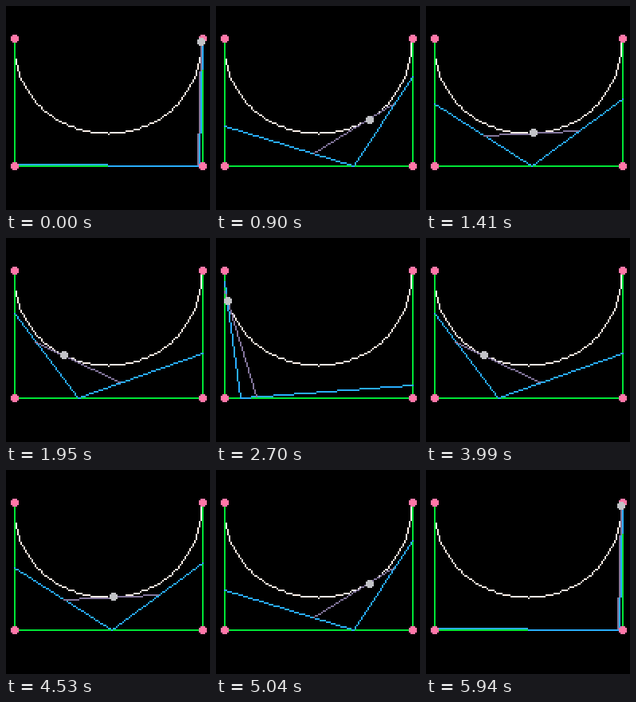
An HTML page with a canvas that plays this animation: 256x256 px, repeating every 5.97 s.

```html
<!DOCTYPE html>
<html lang="en">
<head>
<meta charset="utf-8">
<title>Bézier construction</title>
<style>
  html, body { margin: 0; width: 100%; height: 100%; overflow: hidden; background: #000; }
  canvas { display: block; width: 256px; height: 256px; image-rendering: pixelated; }
</style>
</head>
<body>
<canvas id="stage" width="128" height="128"></canvas>
<script>
  const ctx = document.getElementById('stage').getContext('2d');
  const WHITE = '#fff1e8', GREEN = '#00e436', BLUE = '#29adff';
  const LAVENDER = '#83769c', GREY = '#c2c3c7', PINK = '#ff77a8';
  const STEP = 30, STEPS = 199;
  const corners = [[5, 20], [5, 100], [123, 100], [123, 20]];

  const cell = v => Math.floor(v + 1e-9);
  // Rounds to the nearest cell, halves go down.
  const near = v => Math.ceil(v - 0.5 - 1e-9);

  // One round of de Casteljau: n points become n - 1.
  const reduce = (pts, t) => pts.slice(1).map((p, i) =>
    p.map((v, axis) => pts[i][axis] + (v - pts[i][axis]) * t));

  function line(a, b, color) {
    const [x0, y0] = a.map(cell), [x1, y1] = b.map(cell);
    const n = Math.max(Math.abs(x1 - x0), Math.abs(y1 - y0));
    ctx.fillStyle = color;
    for (let i = 0; i <= n; i++) {
      const f = n ? i / n : 0;
      ctx.fillRect(near(x0 + (x1 - x0) * f), near(y0 + (y1 - y0) * f), 1, 1);
    }
  }

  function path(pts, color) {
    for (let i = 1; i < pts.length; i++) line(pts[i - 1], pts[i], color);
  }

  function dot(p, color) {
    const [x, y] = p.map(cell);
    ctx.fillStyle = color;
    ctx.fillRect(x - 2, y - 1, 5, 3);
    ctx.fillRect(x - 1, y - 2, 3, 5);
  }

  const curve = Array.from({ length: 101 }, (_, i) => {
    let pts = corners;
    while (pts.length > 1) pts = reduce(pts, i / 100);
    return pts[0];
  });

  function draw(t) {
    const outer = reduce(corners, t);
    const inner = reduce(outer, t);
    ctx.fillStyle = '#000';
    ctx.fillRect(0, 0, 128, 128);
    path(curve, WHITE);
    path(corners, GREEN);
    path(outer, BLUE);
    path(inner, LAVENDER);
    corners.forEach(p => dot(p, PINK));
    dot(reduce(inner, t)[0], GREY);
  }

  const start = performance.now();
  function tick() {
    const k = Math.floor((performance.now() - start) / STEP) % STEPS;
    draw(Math.abs(99 - k) / 100);
    requestAnimationFrame(tick);
  }
  tick();
</script>
</body>
</html>
```
